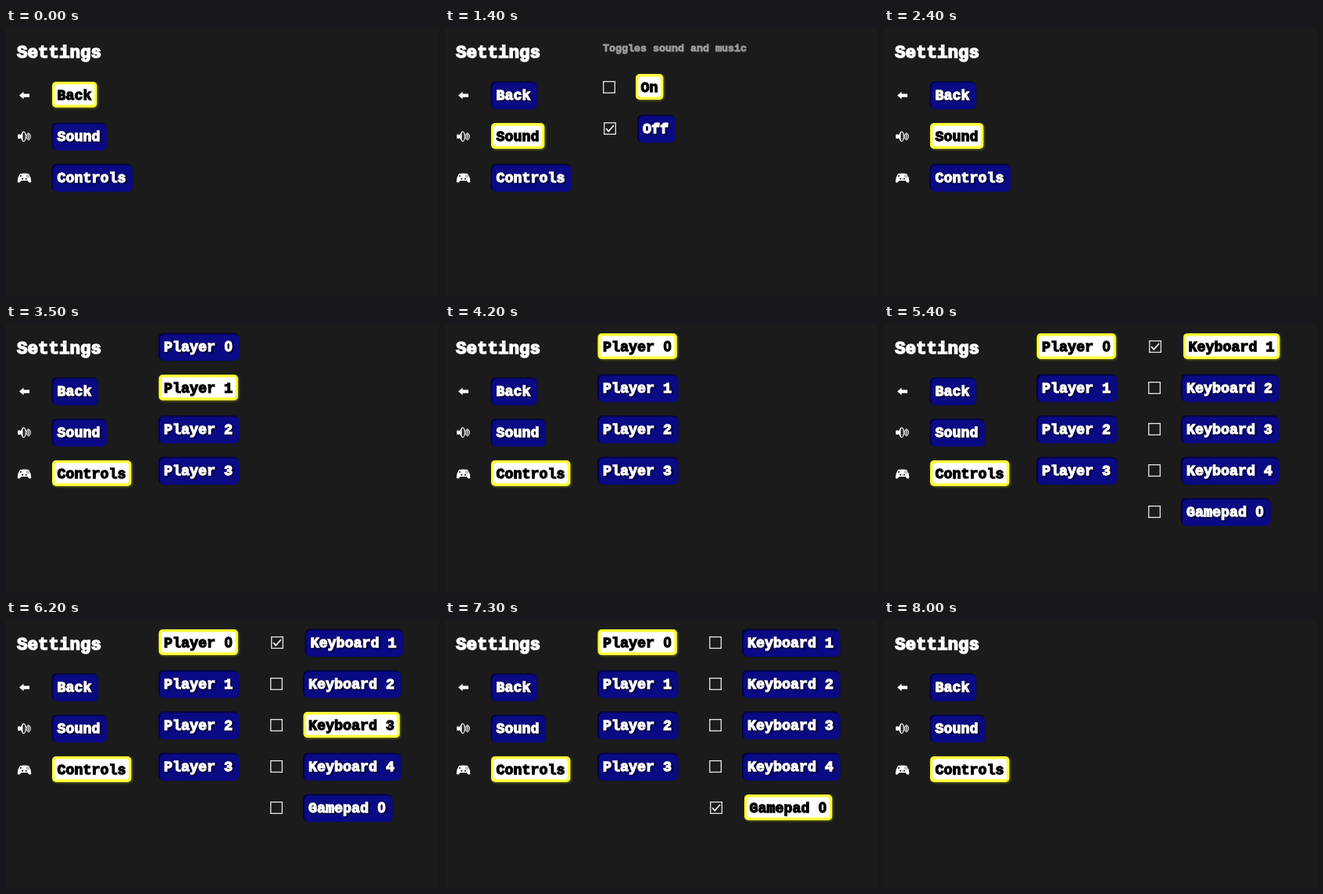
Animation, 554 px wide and 344 px high, one loop 8200 ms. Source, as an HTML page with a canvas:

```html
<!DOCTYPE html>
<html lang="en">
<head>
<meta charset="utf-8">
<title>Settings</title>
<style>
html, body { margin: 0; width: 100%; height: 100%; overflow: hidden; background: #1b1b1b; }
canvas { display: block; }
</style>
</head>
<body>
<canvas id="stage"></canvas>
<script>
const W = 554, H = 344, LOOP = 8200, PITCH = 53, BG = "#1b1b1b";
const canvas = document.getElementById("stage");
const dpr = window.devicePixelRatio || 1;
canvas.width = W * dpr;
canvas.height = H * dpr;
canvas.style.width = W + "px";
canvas.style.height = H + "px";
const ctx = canvas.getContext("2d");

const MENU = ["Back", "Sound", "Controls"];
const PLAYERS = ["Player 0", "Player 1", "Player 2", "Player 3"];
const DEVICES = ["Keyboard 1", "Keyboard 2", "Keyboard 3", "Keyboard 4", "Gamepad 0"];

// Each step patches the state; null hides a panel.
const STEPS = [
  [0, { menu: 0, sound: null, player: null, device: null, soundOn: 1, input: 0 }],
  [400, { menu: 1 }],
  [700, { sound: 1 }],
  [1400, { sound: 0 }],
  [1800, { soundOn: 0 }],
  [2400, { sound: null }],
  [3000, { menu: 2 }],
  [3400, { player: 0 }],
  [3500, { player: 1 }],
  [4200, { player: 0 }],
  [4700, { player: 1 }],
  [4900, { player: 0 }],
  [5300, { device: 0 }],
  [5900, { device: 1 }],
  [6200, { device: 2 }],
  [6300, { device: 3 }],
  [6500, { device: 4 }],
  [7300, { input: 4 }],
  [7800, { device: null }],
  [8000, { player: null }]
];

function stateAt(t) {
  const state = {};
  for (const [start, patch] of STEPS) if (t >= start) Object.assign(state, patch);
  return state;
}

// Heavy fixed-pitch lettering; zero comes from the sans face, which has no dot.
function write(text, x, y, size, color, shadow) {
  const cell = size * 0.6;
  ctx.save();
  ctx.fillStyle = ctx.strokeStyle = color;
  ctx.lineWidth = size * 0.07;
  ctx.miterLimit = 3;
  ctx.textAlign = "center";
  const letters = paint => [...text].forEach((c, i) => {
    const face = c === "0" ? '"Liberation Sans", sans-serif' : '"Liberation Mono", monospace';
    ctx.font = `bold ${size}px ${face}`;
    ctx[paint](c, x + (i + 0.5) * cell, y);
  });
  if (shadow) {
    ctx.shadowColor = "#000";
    ctx.shadowBlur = 2 * dpr;
    ctx.shadowOffsetX = ctx.shadowOffsetY = 1.5 * dpr;
  }
  letters("strokeText");
  ctx.shadowColor = "transparent";
  letters("fillText");
  ctx.restore();
}

function roundBox(x, y, w, h, r, fill) {
  ctx.beginPath();
  ctx.roundRect(x, y, w, h, r);
  ctx.fillStyle = fill;
  ctx.fill();
}

function button(text, x, mid, focused) {
  const w = text.length * 11 + 13.3, top = mid - 17;
  ctx.save();
  if (focused) {
    ctx.shadowColor = "rgba(150,150,20,.75)";
    ctx.shadowBlur = 3 * dpr;
    ctx.shadowOffsetX = ctx.shadowOffsetY = dpr;
    roundBox(x, top, w, 33, 5, "#ffff3c");
    ctx.shadowColor = "transparent";
    roundBox(x + 3.5, top + 3.5, w - 7, 26, 2, "#fff");
  } else {
    roundBox(x - 0.5, top - 0.5, w + 1.5, 35, 6, "#04043c");
    ctx.shadowColor = "#0a0a80";
    ctx.shadowBlur = 2 * dpr;
    roundBox(x + 1.5, top + 1.5, w, 33.5, 6, "#0a0a84");
  }
  ctx.restore();
  write(text, x + 6.5, mid + 5.8, 55 / 3, focused ? "#000" : "#fff", !focused);
}

function line(points, width) {
  ctx.beginPath();
  points.forEach(([x, y]) => ctx.lineTo(x, y));
  ctx.lineWidth = width;
  ctx.strokeStyle = "#f2f2f2";
  ctx.stroke();
}

function checkbox(x, y, checked) {
  ctx.strokeStyle = "#e8e8e8";
  ctx.lineWidth = 1.3;
  ctx.strokeRect(x - 7.3, y - 7.3, 14.6, 14.6);
  if (checked) line([[x - 5, y], [x - 1.8, y + 3.6], [x + 5, y - 4]], 1.7);
}

function column(items, x, mid, focus) {
  items.forEach((text, i) => button(text, x, mid + i * PITCH, i === focus));
}

function choices(items, boxX, x, mid, focus, chosen) {
  items.forEach((text, i) => {
    const on = i === chosen, y = mid + i * PITCH;
    checkbox(boxX + (on ? 1 : 0), y, on);
    button(text, x + (on ? 2.5 : 0), y, i === focus);
  });
}

function shape(points) {
  ctx.beginPath();
  points.forEach(([x, y]) => ctx.lineTo(x, y));
  ctx.fillStyle = "#fff";
  ctx.fill();
}

function dot(x, y, r, color) {
  ctx.beginPath();
  ctx.arc(x, y, r, 0, Math.PI * 2);
  ctx.fillStyle = color;
  ctx.fill();
}

function arrowIcon() {
  shape([[17, 86.5], [22.5, 81.8], [22.5, 84.5], [30, 84.5], [30, 88.7], [22.5, 88.7], [22.5, 91.3]]);
}

function speakerIcon() {
  roundBox(15, 136.5, 3.5, 5.5, 1, "#fff");
  shape([[18, 138], [21.5, 133.5], [21.5, 145], [18, 140.5]]);
  ctx.strokeStyle = "#fff";
  ctx.lineWidth = 1.1;
  ctx.beginPath();
  ctx.ellipse(22.6, 139.3, 2.5, 6.2, 0, 0, Math.PI * 2);
  ctx.stroke();
  [4.2, 6.4, 8.6].forEach((rx, i) => {
    ctx.beginPath();
    ctx.ellipse(22.8, 139.3, rx, 3.5 + i * 1.3, 0, -0.9, 0.9);
    ctx.stroke();
  });
}

function padIcon() {
  ctx.beginPath();
  ctx.moveTo(18, 187);
  ctx.quadraticCurveTo(23.5, 185.8, 29, 187);
  ctx.quadraticCurveTo(32, 191, 32.3, 197);
  ctx.quadraticCurveTo(31, 200.5, 27.5, 196);
  ctx.lineTo(19.5, 196);
  ctx.quadraticCurveTo(16, 200.5, 14.7, 197);
  ctx.quadraticCurveTo(15, 191, 18, 187);
  ctx.fillStyle = "#fff";
  ctx.fill();
  dot(18.8, 190, 1.1, BG);
  dot(21.2, 193.6, 1.1, BG);
  dot(25.8, 193.6, 1.1, BG);
  [[28, 188.6], [28, 191.4], [26.6, 190], [29.4, 190]].forEach(([x, y]) => dot(x, y, 0.6, BG));
}

function draw(t) {
  const s = stateAt(t);
  ctx.setTransform(dpr, 0, 0, dpr, 0, 0);
  ctx.fillStyle = BG;
  ctx.fillRect(0, 0, W, H);

  write("Settings", 14, 37.7, 22.5, "#fff");
  arrowIcon();
  speakerIcon();
  padIcon();
  column(MENU, 59, 86, s.menu);
  if (s.sound !== null) {
    write("Toggles sound and music", 202, 30.3, 40 / 3, "#999");
    choices(["On", "Off"], 210, 244, 76, s.sound, s.soundOn);
  }
  if (s.player !== null) column(PLAYERS, 195.5, 29, s.player);
  if (s.device !== null) choices(DEVICES, 346, 380.5, 29, s.device, s.input);
}

function tick() {
  draw(performance.now() % LOOP);
  requestAnimationFrame(tick);
}
tick();
</script>
</body>
</html>
```
